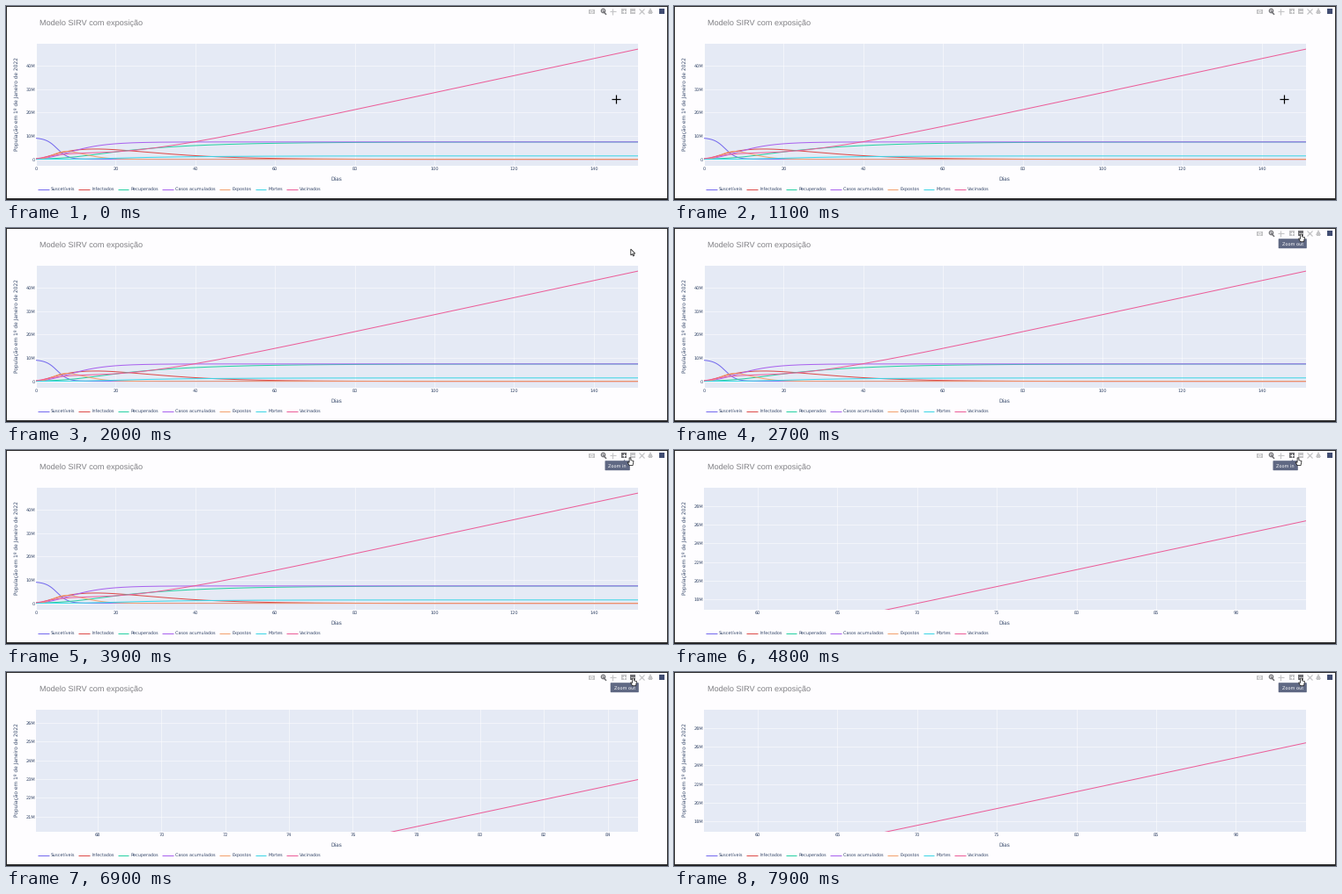
Recreate the animation shown at these times as a matplotlib script. Size 751 by 221 pixels, loop 8 s.

```python
import numpy as np
import matplotlib.pyplot as plt
from matplotlib.animation import FuncAnimation
from matplotlib.patches import FancyBboxPatch, Polygon, Rectangle
from matplotlib.ticker import FuncFormatter

W, H, DPI = 751, 221, 100
PX = 72 / DPI
INK, PLOT_BG = "#36486a", "#e5eaf5"
IDLE, ACTIVE = "#c4c4c6", "#6f6f73"
LEFT, TOP, PW, PH = 34, 42.5, 682.5, 139
MID, HALF = np.array([75.5, 23.47]), np.array([75.5, 26.03])

plt.rcParams["font.family"] = "DejaVu Sans"
plt.rcParams["text.hinting"] = "no_hinting"


def ramp(t, start, soft):
    """Zero before start, then slope one, with a soft corner."""
    return soft * np.logaddexp(0, (t - start) / soft)


def wave(t, peak, sharp):
    """Rises to one at the peak and dies away."""
    u = t / peak
    return (u * np.exp(1 - u)) ** sharp


# Population in millions by day
t = np.linspace(0, 151, 605)
SERIES = {
    "Suscetíveis": ("#7368ee", 9.2 / (1 + np.exp((t - 5.3) / 1.4))),
    "Infectados": ("#dd4a48", 4.4 * wave(t, 15, 1.52)),
    "Recuperados": ("#25d0a2", 7.4 * (1 - np.exp(-.052 * ramp(t, 9.5, 4)))),
    "Casos acumulados": ("#a860ee", 7.42 * np.exp(-4 * np.exp(-.18 * t))),
    "Expostos": ("#f3a06c", 3.35 * wave(t, 7.8, 4) + .4 * np.exp(-t / 3)),
    "Mortes": ("#3bd5e6", 1.45 * (1 - np.exp(-.057 * ramp(t, 13.5, 4)))),
    "Vacinados": ("#ec5c98", .364 * ramp(t, 21.9, 12.3) + 1.1 * wave(t, 9, 2) - .4 * np.exp(-t / 3)),
}

fig = plt.figure(figsize=(W / DPI, H / DPI), dpi=DPI, facecolor="#262628")
fig.add_artist(Rectangle((1 / W, 2 / H), 1 - 2.5 / W, 1 - 3 / H, fc="#fefdff", lw=0,
                         transform=fig.transFigure, zorder=-1))

# Chart
ax = fig.add_axes([LEFT / W, 1 - (TOP + PH) / H, PW / W, PH / H], facecolor=PLOT_BG)
ax.spines[:].set_visible(False)
ax.set_axisbelow(True)
ax.grid(color="white", lw=PX, alpha=.5)
for zero_line in (ax.axhline, ax.axvline):
    zero_line(0, color="white", lw=PX, alpha=.85, zorder=1)
ax.tick_params(length=0, labelsize=4.95 * PX, labelcolor=INK, pad=PX)
ax.tick_params(axis="x", pad=1.8 * PX)
ax.xaxis.set_major_formatter(FuncFormatter(lambda v, _: f"{v:g}"))
ax.yaxis.set_major_formatter(FuncFormatter(lambda v, _: f"{v:g}M" if v else "0"))

# Everything else, in pixels
ui = fig.add_axes([0, 0, 1, 1], xlim=(0, W), ylim=(H, 0), zorder=5)
ui.axis("off")


def text(x, y, s, size, color=INK, **kw):
    kw.setdefault("va", "center_baseline")
    return ui.text(x, y, s, fontsize=size * PX, color=color, **kw)


def icon(x, y, marker, size, color=IDLE, width=0.0, **kw):
    return ui.plot(x, y, marker, color=color, ms=size * PX, mew=width * PX, **kw)[0]


text(38, 21.7, "Modelo SIRV com exposição", 9.2, "#808084", va="baseline", family="Liberation Sans")
text(LEFT + PW / 2, 197, "Dias", 5.9, ha="center")
text(11.6, TOP + PH / 2, "População em 1º de Janeiro de 2022", 5.9, ha="center", va="center", rotation=90)

x = 36
for name, (color, values) in SERIES.items():
    ax.plot(t, values, color=color, lw=PX, zorder=3)
    ui.plot([x, x + 12.5], [208.5, 208.5], color=color, lw=PX, solid_capstyle="butt")
    label = text(x + 14.7, 208.5, name, 4.92)
    x = label.get_window_extent().x1 + 4.2

# Toolbar
BUTTON_X = {"in": 700.6, "out": 710.7}
buttons = {key: icon(bx, 6.1, "s", 6.4) for key, bx in BUTTON_X.items()}
bar = [
    *buttons.values(),
    icon(BUTTON_X["in"], 6.1, "+", 4, "white", 1),
    icon(BUTTON_X["out"], 6.1, "_", 4, "white", 1),
    ui.add_patch(Rectangle((660.6, 3.6), 7, 5, fc=IDLE, lw=0)),
    icon(664.1, 6.1, "o", 3, IDLE, .8, mec="white"),
    icon(676.6, 5.3, "o", 4.4, ACTIVE, 1.2, mfc="none"),
    icon(676.6, 5.3, "+", 2.4, ACTIVE, .8),
    ui.plot([678.1, 680.5], [6.9, 9.3], color=ACTIVE, lw=1.5 * PX)[0],
    icon(687.5, 6.1, "+", 7, IDLE, 1.1),
    icon(720.6, 6.1, "x", 6.2, IDLE, 1.2),
    icon(730.8, 4.8, "^", 6),
    icon(730.8, 7.2, "s", 4),
    icon(744, 6.1, "s", 6.6, "#414d72"),
]


def tooltip(x, left, right, label, color="#5f6883"):
    return [ui.add_patch(FancyBboxPatch((left + 1, 13.2), right - left - 2, 9, fc=color, lw=0,
                                        boxstyle="round,pad=1,rounding_size=.7")),
            icon(x, 11.8, "^", 3.5, color),
            text((left + right) / 2, 17.6, label, 4.95, "white", ha="center")]


tips = {"in": tooltip(BUTTON_X["in"], 679.5, 707.8, "Zoom in"),
        "out": tooltip(BUTTON_X["out"], 685.7, 717.8, "Zoom out")}

# Pointers, drawn from their hot spot
ARROW = np.array([(0, 0), (0, 7), (1.6, 5.6), (2.7, 8), (3.8, 7.5), (2.8, 5.2), (4.9, 5.1)])
HAND = np.array([(-.9, .3), (.9, .3), (.9, 3), (4, 4), (3, 9), (-.9, 9), (-3, 5.2), (-.9, 5.6)])
cross = icon(0, 0, "+", 10.5, "black", 1.2, zorder=9)
pointer = ui.add_patch(Polygon(ARROW, fc="white", ec="#222222", lw=.8 * PX, zorder=9))

START, REST = np.array([692, 106]), np.array([708.8, 24])
ON_OUT, ON_IN = np.array([711.5, 6.7]), np.array([708, 8.6])
MOVES = [(11, 19, REST), (21, 26, ON_OUT), (28, 29, ON_IN), (56, 59, ON_OUT)]


def pointer_at(i):
    pos = START
    for begin, end, goal in MOVES:
        s = np.clip((i - begin) / (end - begin), 0, 1)
        pos = pos + (goal - pos) * s * s * (3 - 2 * s)
    return pos


def nice_step(rough):
    base = 10 ** np.floor(np.log10(rough))
    return next(n * base for n in (2, 5, 10) if n * base >= rough)


def zoom(level):
    low, high = MID - HALF / 2 ** level, MID + HALF / 2 ** level
    for axis, lo, hi, count in zip((ax.xaxis, ax.yaxis), low, high, (10, 8.5)):
        step = nice_step((hi - lo) / count)
        axis.set_ticks(np.arange(np.ceil(lo / step) * step, hi, step))
    ax.set(xlim=(low[0], high[0]), ylim=(low[1], high[1]))


def draw(i):
    clicks_in = sum(i >= c for c in (42, 48, 53))
    zoom(clicks_in - (i >= 78))

    pos = pointer_at(i)
    on_plot = pos[1] > TOP
    cross.set_data([pos[0]], [pos[1]])
    cross.set_visible(on_plot)
    pointer.set_xy((ARROW if pos[1] > 10 else HAND) + pos)
    pointer.set_visible(not on_plot)

    hover = "in" if 29 <= i < 58 else "out" if i >= 26 else None
    for key, parts in tips.items():
        buttons[key].set_color(ACTIVE if key == hover else IDLE)
        for part in parts:
            part.set_visible(key == hover)

    alpha = np.interp(i, [16, 19, 20, 23], [1, 0, 0, 1])
    for part in bar:
        part.set_alpha(alpha)


anim = FuncAnimation(fig, draw, frames=80, interval=100, init_func=lambda: draw(0),
                     repeat=True, repeat_delay=0, blit=False)
plt.show()
```
